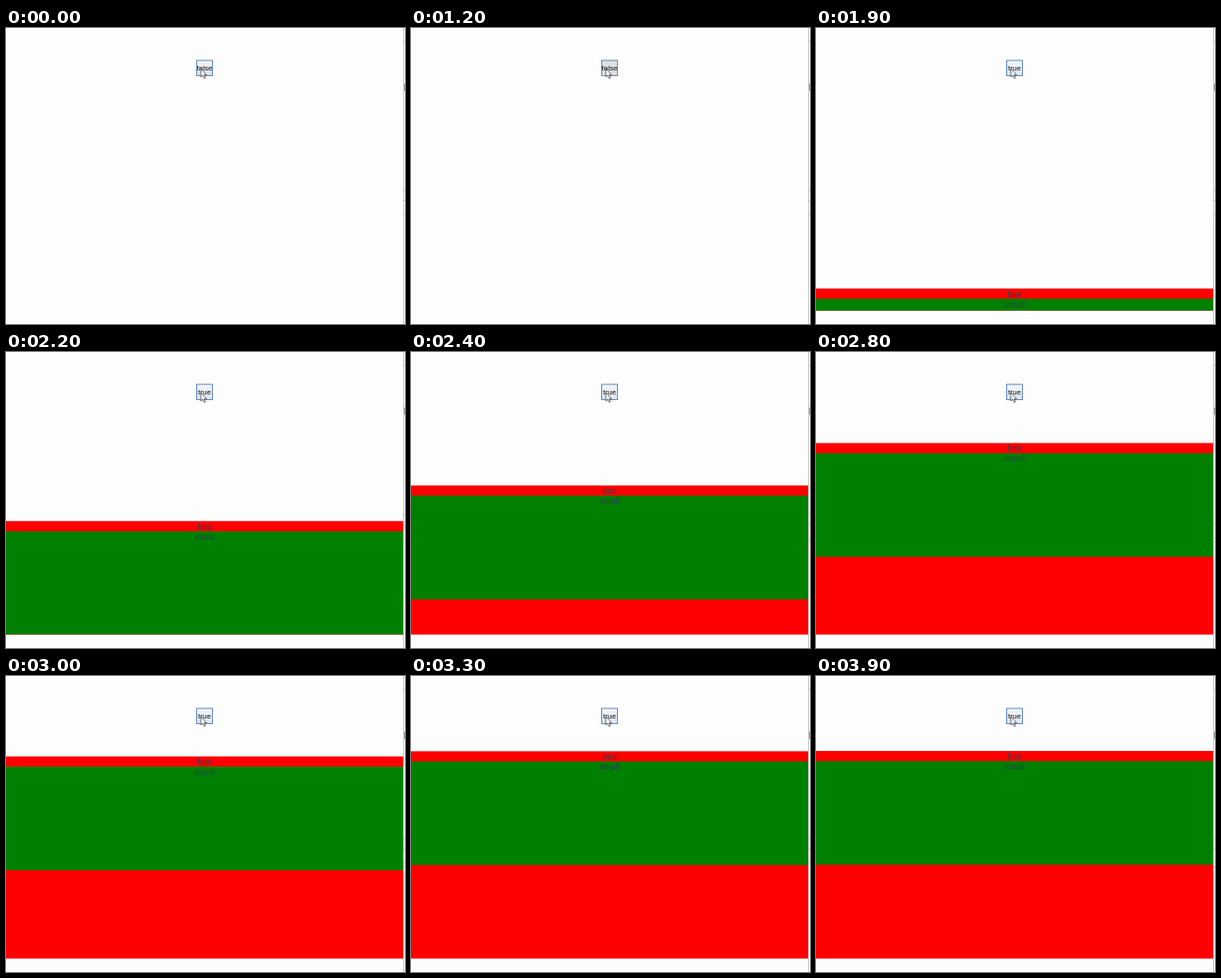
These frames come from a looping animation (430 by 320 pixels, 4000 ms). An HTML page:

```html
<!DOCTYPE html>
<html lang="en">
<head>
<meta charset="utf-8">
<title>Sliding box</title>
<style>
  html, body { margin: 0; width: 100%; height: 100%; overflow: hidden; background: #fdfdfd; }
  svg { display: block; }
  text { font-family: "Liberation Sans", Arial, sans-serif; text-anchor: middle; }
  .label { font-size: 9.5px; fill: #2c3e50; }
  .button { font-size: 8px; fill: #111; }
</style>
</head>
<body>
<svg width="430" height="320" viewBox="0 0 430 320">
  <defs>
    <clipPath id="view"><rect width="428" height="305.5"/></clipPath>
    <linearGradient id="idle" x2="0" y2="1">
      <stop stop-color="#f3f3f3"/><stop offset="1" stop-color="#dde0e5"/>
    </linearGradient>
    <linearGradient id="hover" x2="0" y2="1">
      <stop stop-color="#f3f6fa"/><stop offset="1" stop-color="#dde5ee"/>
    </linearGradient>
  </defs>
  <rect width="430" height="320" fill="#fdfdfd"/>
  <g clip-path="url(#view)">
    <g id="box">
      <rect width="428" height="320" fill="#f00"/>
      <rect y="11" width="428" height="112" fill="#008000"/>
      <text class="label" x="214" y="9">box</text>
      <text class="label" x="214" y="20">small</text>
    </g>
  </g>
  <rect x="428" width="1" height="320" fill="#c8c8c8"/>
  <path d="M429 14.5h1M429 175.5h1M429 186.5h1M429 201.5h1" stroke="#bbb"/>
  <path d="M429.5 60v8" stroke="#999"/>
  <rect id="face" x="205.5" y="35" width="17" height="16.5" stroke="#5f8abb"/>
  <text id="state" class="button" x="214" y="46"></text>
  <path d="M210 44v9l2-1.8 1.5 3.3 1.5-.7-1.5-3.2h2.7z" fill="#fff" stroke="#333" stroke-width=".7"/>
</svg>
<script>
const LOOP = 4000, PRESS = 1200, RELEASE = 1400, ENTER = 1845;
const [box, face, state] = ["box", "face", "state"].map(id => document.getElementById(id));

// Ease-out slide: [time in ms, top in px, speed in px/ms]
const slide = [
  [1900, 282, -.39], [2200, 183, -.23], [2600, 118, -.11], [3000, 87, -.03], [3400, 81, 0]
];

function boxTop(t) {
  const [t0, y0, v0] = slide[0];
  if (t < ENTER) return 320;
  if (t < t0) return y0 + v0 * (t - t0);
  const i = slide.findIndex(key => key[0] > t);
  if (i < 0) return slide[slide.length - 1][1];
  const [ta, ya, va] = slide[i - 1], [tb, yb, vb] = slide[i];
  const d = tb - ta, u = (t - ta) / d, w = 1 - u;
  return w * w * (1 + 2 * u) * ya + u * u * (3 - 2 * u) * yb
    + d * u * w * (w * va - u * vb);
}

function draw(t) {
  const open = t >= RELEASE;
  box.setAttribute("transform", `translate(0 ${boxTop(t).toFixed(2)})`);
  face.setAttribute("fill", open ? "url(#hover)" : t >= PRESS ? "#dedfe0" : "url(#idle)");
  state.textContent = String(open);
}

const start = performance.now();
function tick(now) {
  draw(Math.max(0, now - start) % LOOP);
  requestAnimationFrame(tick);
}
draw(0);
requestAnimationFrame(tick);
</script>
</body>
</html>
```
